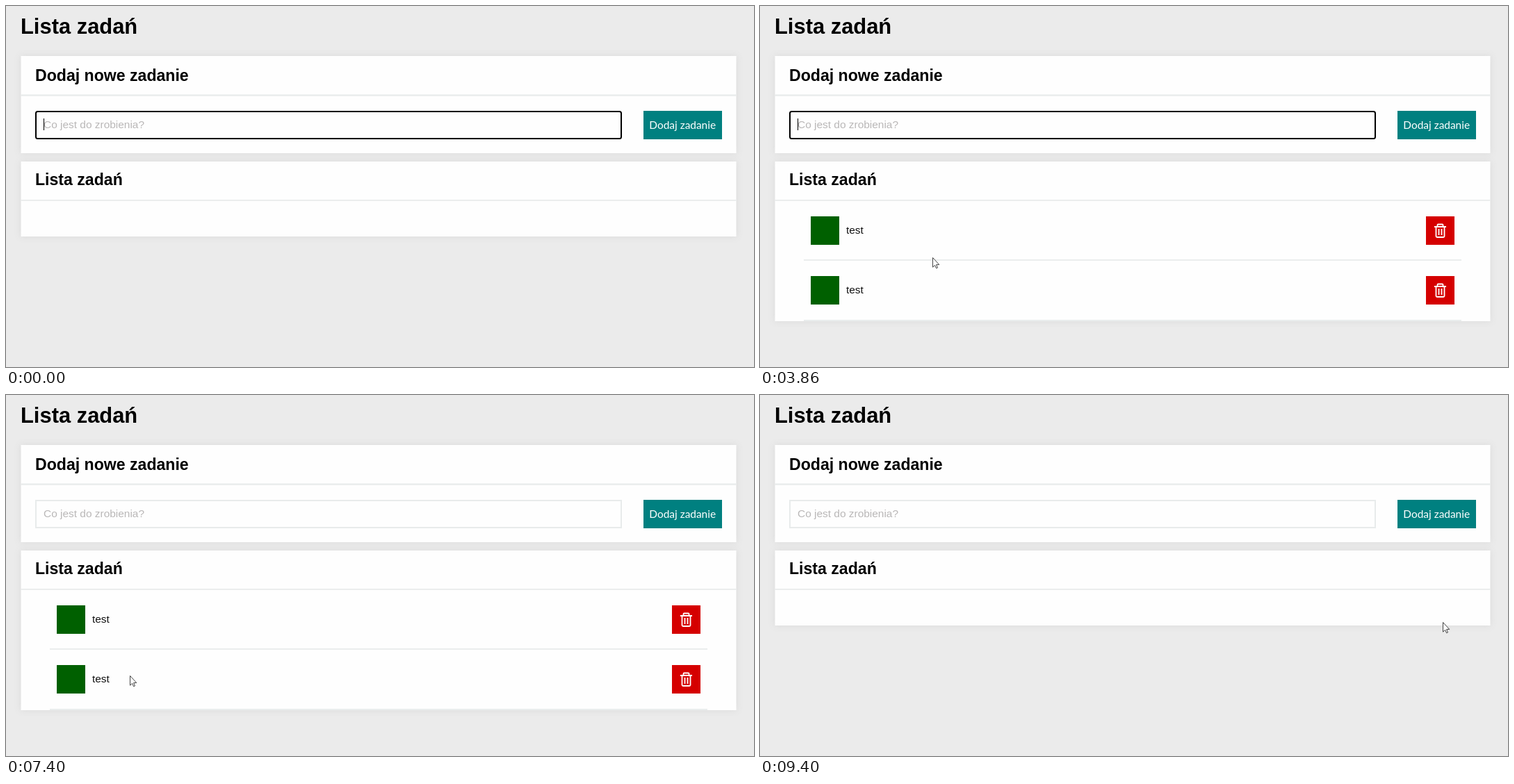
An HTML page that plays this animation: 1076 by 520 pixels, repeating every 9.6 s.

```html
<!DOCTYPE html>
<html lang="pl">
<head>
<meta charset="utf-8">
<title>Lista zadań</title>
<style>
  html, body { margin: 0; width: 100%; height: 100%; overflow: hidden; background: #ebebeb; }
  svg { display: block; }
  text { font: 15.45px "Liberation Sans", Arial, sans-serif; fill: #111; }
  .h1 { font-size: 30.9px; font-weight: bold; fill: #000; }
  .h2 { font-size: 23.1px; font-weight: bold; fill: #000; }
  .panel { fill: #fefefe; filter: drop-shadow(0 0 5px #d9d9d9); }
  .line { fill: #e8ebeb; }
  .hint { fill: #b9b7b7; }
  .add { font-family: Lato, sans-serif; fill: #fff; }
  .done { text-decoration: line-through; }
  .ring { fill: none; stroke: #000; stroke-width: 2; }
  .icon { fill: none; stroke: #fff; stroke-width: 1.8; }
</style>
</head>
<body>
<svg width="1076" height="520" viewBox="0 0 1076 520">
  <defs>
    <g id="trash" class="icon">
      <path d="M970 318H987M974.5 318V315.5Q974.5 314.5 975.5 314.5H981.5Q982.5 314.5 982.5 315.5V318"/>
      <path d="M972.5 318V331.5Q972.5 333 974 333H983Q984.5 333 984.5 331.5V318M976.5 321V330M980.5 321V330"/>
    </g>
  </defs>

  <text class="h1" x="21" y="40">Lista zadań</text>

  <rect class="panel" x="21.5" y="72" width="1029" height="140"/>
  <text class="h2" x="42" y="108">Dodaj nowe zadanie</text>
  <rect class="line" x="21.5" y="127.5" width="1029" height="2.2"/>
  <rect id="field" x="43" y="152" width="842" height="39" fill="#fefefe" stroke-width="2"/>
  <text id="hint" class="hint" x="54" y="176">Co jest do zrobienia?</text>
  <text id="typed" x="54" y="176"></text>
  <rect id="caret" y="162" width="1" height="17"/>
  <rect x="917" y="151" width="113" height="41" fill="teal"/>
  <text class="add" x="925.3" y="177">Dodaj zadanie</text>

  <rect id="list" class="panel" x="21.5" y="224" width="1029" height="108"/>
  <text class="h2" x="42" y="258">Lista zadań</text>
  <rect class="line" x="21.5" y="279" width="1029" height="1.7"/>
  <g id="rows"></g>

  <rect id="ring" class="ring" width="42" height="42" rx="2.5"/>
  <g id="mouse">
    <circle id="glow" r="11" fill="#ff0" opacity=".6"/>
    <path d="M.5 .5V14.2L3.6 11.4L5.6 15.8L7.5 15L5.6 10.6H9.8Z" fill="#fff" stroke="#444"/>
  </g>
</svg>

<script>
const LOOP = 9600, PITCH = 86, BLUR = 4540;
const $ = id => document.getElementById(id);
const show = (el, on) => el.setAttribute('visibility', on ? 'visible' : 'hidden');
const within = (t, [from, to]) => t >= from && t < to;

const word = 'test';
const typing = [
  { keys: [390, 660, 930, 1130], enter: 1460 },
  { keys: [1990, 2190, 2460, 2590], enter: 2870 }
];
const caretOff = [[130, 390], [1660, 1990], [3130, 3390], [3930, 4200], [BLUR, LOOP]];

const tasks = [
  { life: [1460, 9400], done: [4660, 6430] },
  { life: [2870, 8520], done: [5680, 7330] }
];

// Mouse presses: time span, row, x of the pressed button
const CHECK = 73, TRASH = 958;
const presses = [
  { span: [4540, 4660], row: 0, x: CHECK },
  { span: [5550, 5680], row: 1, x: CHECK },
  { span: [6300, 6430], row: 0, x: CHECK },
  { span: [7200, 7330], row: 1, x: CHECK },
  { span: [8390, 8520], row: 1, x: TRASH },
  { span: [9270, 9400], row: 0, x: TRASH }
];

// Pointer path: time, x, y, eased arrival
const path = [
  [3390, 708, 504], [3600, 450, 418], [3860, 248, 362], [4060, 132, 342], [4270, 99, 335],
  [4800, 99, 335], [4870, 103, 344], [5280, 99, 417, 1],
  [5680, 99, 417], [6230, 99, 327, 1],
  [6500, 99, 327], [7060, 102, 409, 1],
  [7330, 102, 409], [7540, 330, 394], [7820, 760, 386], [8100, 960, 408], [8240, 976, 410],
  [8520, 976, 410], [9000, 982, 327, 1], [LOOP, 982, 327]
];

function pointer(t) {
  const i = path.findIndex(p => p[0] > t);
  const [t0, x0, y0] = path[i - 1], [t1, x1, y1, eased] = path[i];
  const steps = Math.round((t1 - t0) / 70);
  let u = Math.floor((t - t0) / (t1 - t0) * steps) / steps;
  if (eased) u = u * u * (3 - 2 * u);
  return [Math.round(x0 + (x1 - x0) * u), Math.round(y0 + (y1 - y0) * u)];
}

$('rows').innerHTML = tasks.map((_, i) => `
  <g>
    <g transform="translate(0 ${i * PITCH})">
      <rect x="73" y="303" width="41" height="41" fill="#006000"/>
      <path class="icon tick" style="stroke-width:1.6" d="M87.5 323.5L91.3 327.3L98.7 319.7"/>
      <text x="124" y="328">${word}</text>
      <rect x="958" y="303" width="41" height="41" fill="#d50000"/>
      <use href="#trash"/>
    </g>
    <rect class="line" x="63" y="${365 + i * (PITCH + 1)}" width="946" height="1.8"/>
  </g>`).join('');

const views = [...$('rows').children].map(g => ({
  g, tick: g.querySelector('.tick'), label: g.querySelector('text')
}));

function drawField(t) {
  const run = typing.find(r => t < r.enter);
  const text = run ? word.slice(0, run.keys.filter(k => t >= k).length) : '';
  const typed = $('typed'), focused = t < BLUR;
  if (typed.textContent !== text) typed.textContent = text;
  show($('hint'), !text);
  show($('caret'), !caretOff.some(s => within(t, s)));
  $('caret').setAttribute('x', 54 + Math.round(text ? typed.getComputedTextLength() : 0));
  $('field').setAttribute('stroke', focused ? '#000' : '#e8ebeb');
  $('field').setAttribute('rx', focused ? 2.5 : 0);
}

function drawList(t) {
  let count = 0;
  tasks.forEach((task, i) => {
    const alive = within(t, task.life), done = alive && within(t, task.done);
    count += alive;
    show(views[i].g, alive);
    show(views[i].tick, done);
    views[i].label.classList.toggle('done', done);
  });
  $('list').setAttribute('height', [108, 143, 230][count]);
}

function drawMouse(t) {
  const press = presses.find(p => within(t, p.span));
  const visible = t >= path[0][0];
  show($('ring'), press);
  show($('glow'), press);
  show($('mouse'), visible);
  if (press) {
    $('ring').setAttribute('x', press.x - .5);
    $('ring').setAttribute('y', 302.5 + press.row * PITCH);
  }
  if (visible) $('mouse').setAttribute('transform', `translate(${pointer(t)})`);
}

const start = performance.now();
function frame() {
  const t = (performance.now() - start) % LOOP;
  drawField(t);
  drawList(t);
  drawMouse(t);
  requestAnimationFrame(frame);
}
frame();
</script>
</body>
</html>
```
